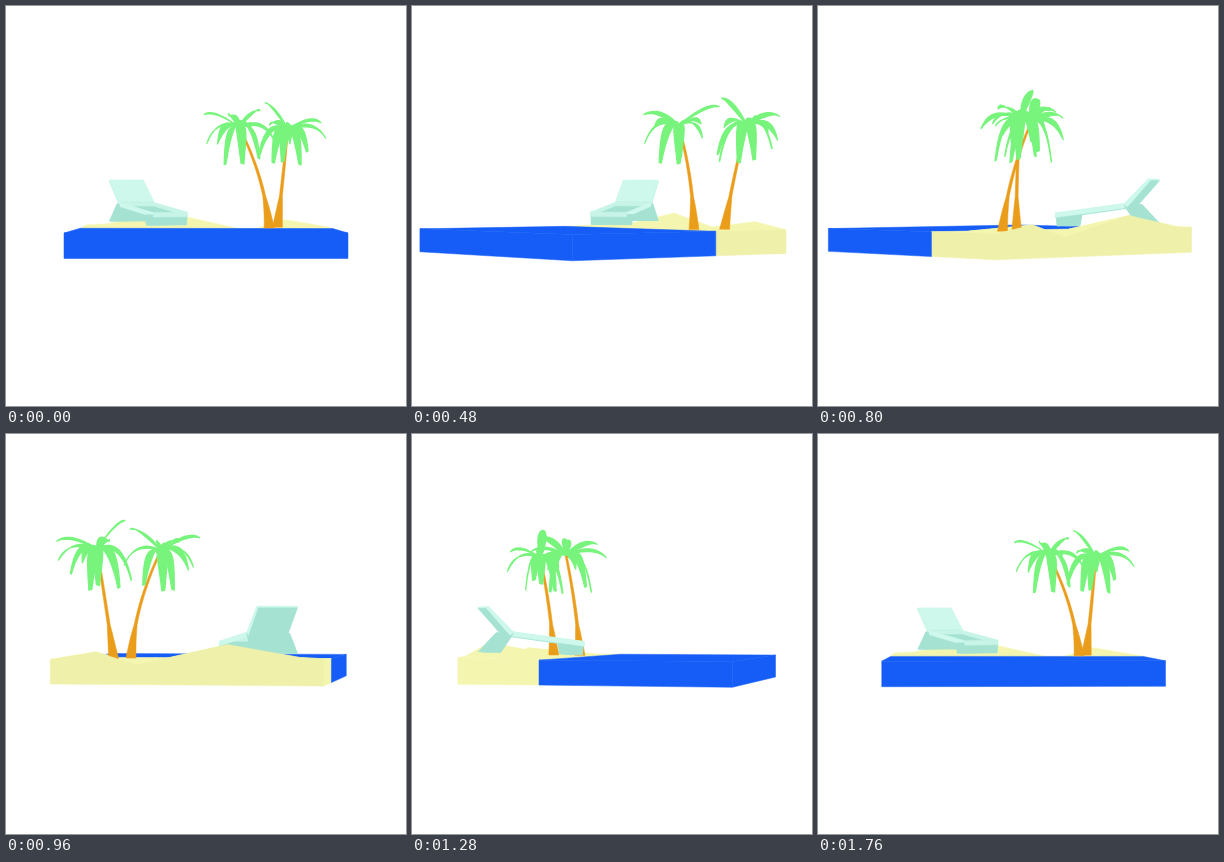
These frames come from a looping animation (400 px wide and 400 px high, 1.84 s). An HTML page with a canvas:

```html
<!DOCTYPE html>
<html lang="en">
<head>
<meta charset="utf-8">
<title>Turning island</title>
<style>
  html, body { margin: 0; width: 100%; height: 100%; overflow: hidden; background: #fff; }
  canvas { display: block; width: 100%; height: 100%; }
</style>
</head>
<body>
<canvas id="stage" width="400" height="400"></canvas>
<script>
const ctx = document.getElementById('stage').getContext('2d');
const LOOP = 1840, STEP = 80, TURN = 1860;
const WATER = '#155df6', SAND = '#f4f6b0', SAND_BACK = '#eff0a9';
const MINT = '#cff8ec', MINT_SEAT = '#c7f4e7', MINT_DARK = '#a5e2d2';
const LEAF = '#78f47d', TRUNK = '#ea9c1b';

// Island, seen from above: x to the right, f towards the viewer, h above the water.
const SIDE = 142, FRONT = 160, BACK = -128, BOTTOM = -25.5;
const SHORE_L = -40, SHORE_R = -26;
const ridge = [[-142, 2], [-119, 3], [-44, 16], [50, -5], [94, 8], [142, 0]];

// Each frond is the offset of its tip from the crown: x, f, h.
const palms = [
  { base: [72, -57], bend: [67, -60], crown: [38, -64], fronds: [
    [-40, 13, 14], [-37, -10, -18], [-16, -14, -42], [3, 29, -42], [22, 17, -36],
    [25, -38, 21], [40, 0, -15], [-8, -40, 3], [12, 44, -3], [-12, 40, 11], [-25, 28, -20]] },
  { base: [83, -92], bend: [90, -98], crown: [96, -113], fronds: [
    [-27, 13, 30], [44, 10, -11], [40, -11, 8], [24, -15, -26], [13, 24, -42],
    [-18, 24, -40], [-34, 12, -32], [5, -42, -16], [-5, -16, -38], [5, 38, -4], [-20, -30, 6]] }
];
const CROWN_H = 115;

// Lounger parts: side profile as [distance from head, height], a colour per edge, a colour for the ends.
const lounger = { head: [-93, -116], along: [0.51, 0.86], half: 22, parts: [
  { profile: [[27, 27], [17, 27], [-2, 7], [13, 7]], edges: [MINT_DARK, MINT_DARK, MINT_DARK, MINT_DARK], ends: MINT_DARK },
  { profile: [[86, 15], [103, 15], [102, 4], [88, 4]], edges: [MINT_DARK, MINT_DARK, MINT_DARK, MINT_DARK], ends: MINT_DARK },
  { profile: [[23, 29], [104, 18], [104, 13], [25, 24]], edges: [MINT_SEAT, MINT_SEAT, MINT_DARK, MINT_DARK], ends: MINT },
  { profile: [[0, 55], [27, 28], [23, 25], [-3, 54]], edges: [MINT, MINT, MINT_DARK, MINT], ends: MINT }
] };

let cos = 1, sin = 0;

const near = (x, f) => f * cos + x * sin;

function project([x, f, h]) {
  const scale = 1550 / (1710 - near(x, f));
  return [200 + (x * cos - f * sin) * scale, 185.6 + (41.4 - h) * scale];
}

function polygon(points, color, line = 0.5) {
  ctx.beginPath();
  points.forEach(p => ctx.lineTo(p[0], p[1]));
  ctx.closePath();
  ctx.fillStyle = ctx.strokeStyle = color;
  ctx.lineWidth = line;
  ctx.lineJoin = 'round';
  ctx.fill();
  ctx.stroke();
}

const face = (points, color) => polygon(points.map(project), color);

const bezier = (a, b, c, u) => (1 - u) * (1 - u) * a + 2 * u * (1 - u) * b + u * u * c;

function ease(t) {
  let lo = 0, hi = 1;
  for (let i = 0; i < 24; i++) {
    const s = (lo + hi) / 2, r = 1 - s;
    if (1.2 * s * r * r + 1.8 * s * s * r + s ** 3 < t) lo = s; else hi = s;
  }
  return lo * lo * (3 - 2 * lo);
}

function wall(x0, f0, x1, f1, color, h0 = 0, h1 = 0) {
  face([[x0, f0, h0], [x1, f1, h1], [x1, f1, BOTTOM], [x0, f0, BOTTOM]], color);
}

function waterTop() {
  face([[-SIDE, FRONT, 0], [SIDE, FRONT, 0], [SIDE, SHORE_R, 0], [-SIDE, SHORE_L, 0]], WATER);
}

function sandTop() {
  const shore = x => SHORE_L + (SHORE_R - SHORE_L) * (x + SIDE) / (2 * SIDE);
  ridge.slice(1).forEach(([x1, h1], i) => {
    const [x0, h0] = ridge[i];
    face([[x0, BACK, h0], [x1, BACK, h1], [x1, shore(x1), 0], [x0, shore(x0), 0]], SAND);
  });
}

function ground() {
  const layers = cos > 0 ? [sandTop, waterTop] : [waterTop, sandTop];
  layers.forEach(draw => draw());
}

// A side faces the viewer when its outward normal points at the camera.
const visible = (x, f, nx, nf) =>
  (nx * cos - nf * sin) * -(x * cos - f * sin) + near(nx, nf) * (1710 - near(x, f)) > 0;

function sides() {
  for (const [x, shore, color, edge] of [[-SIDE, SHORE_L, SAND, 2], [SIDE, SHORE_R, SAND_BACK, 0]]) {
    if (!visible(x, 0, x, 0)) continue;
    wall(x, BACK, x, shore, color, edge, 0);
    wall(x, shore, x, FRONT, WATER);
  }
  if (visible(0, FRONT, 0, 1)) wall(-SIDE, FRONT, SIDE, FRONT, WATER);
  if (visible(0, BACK, 0, -1)) {
    const top = ridge.map(([x, h]) => [x, BACK, h]);
    face([...top, [SIDE, BACK, BOTTOM], [-SIDE, BACK, BOTTOM]], SAND_BACK);
  }
}

function drawFrond([cx, cf], [dx, df, dh]) {
  const reach = Math.hypot(dx, df), lift = Math.max(dh * 0.6, 0) + 12;
  const left = [], right = [];
  for (let i = 0; i <= 10; i++) {
    const u = i / 10, r = bezier(0, 0.7, 1, u), h = CROWN_H + bezier(0, lift, dh, u);
    const w = 4.6 * Math.sin(Math.PI * u ** 0.85) + (dh < -20 ? 1.6 * u : 0);
    const px = -df / reach * w, pf = dx / reach * w, x = cx + dx * r, f = cf + df * r;
    left.push(project([x + px, f + pf, h + w * 0.3]));
    right.unshift(project([x - px, f - pf, h - w * 0.3]));
  }
  polygon([...left, ...right], LEAF, 1.3);
}

function drawPalm({ base, bend, crown, fronds }) {
  const left = [], right = [];
  for (let i = 0; i <= 16; i++) {
    const u = i / 16;
    const [x, y] = project([0, 1].map(k => bezier(base[k], bend[k], crown[k], u)).concat(u * CROWN_H));
    const w = u < 0.3 ? 5 - u * 11 : 1.7 - 0.7 * u;
    left.push([x - w, y]);
    right.unshift([x + w, y]);
  }
  polygon([...left, ...right], TRUNK);
  fronds.forEach(tip => drawFrond(crown, tip));
}

function drawLounger({ head, along: [ax, af], half, parts }) {
  const faces = [];
  const at = ([t, h], side) => [head[0] + ax * t + af * half * side, head[1] + af * t - ax * half * side, h];
  const add = (points, color) =>
    faces.push({ points, color, depth: points.reduce((sum, p) => sum + near(p[0], p[1]), 0) / points.length });
  for (const { profile, edges, ends } of parts) {
    profile.forEach((p, i) => {
      const q = profile[(i + 1) % profile.length];
      add([at(p, -1), at(q, -1), at(q, 1), at(p, 1)], edges[i]);
    });
    for (const side of [-1, 1]) add(profile.map(p => at(p, side)), ends);
  }
  faces.sort((a, b) => a.depth - b.depth).forEach(f => face(f.points, f.color));
}

const objects = [
  ...palms.map(palm => ({ spot: palm.base, draw: () => drawPalm(palm) })),
  { spot: [-65, -70], draw: () => drawLounger(lounger) }
];

function render(now) {
  const time = Math.floor(now % LOOP / STEP) * STEP;
  const angle = ease(time / TURN) * 2 * Math.PI;
  cos = Math.cos(angle);
  sin = Math.sin(angle);
  ctx.fillStyle = '#fff';
  ctx.fillRect(0, 0, 400, 400);
  ground();
  objects.sort((a, b) => near(...a.spot) - near(...b.spot)).forEach(o => o.draw());
  sides();
}

const start = performance.now();
function tick() {
  render(performance.now() - start);
  requestAnimationFrame(tick);
}
tick();
</script>
</body>
</html>
```
